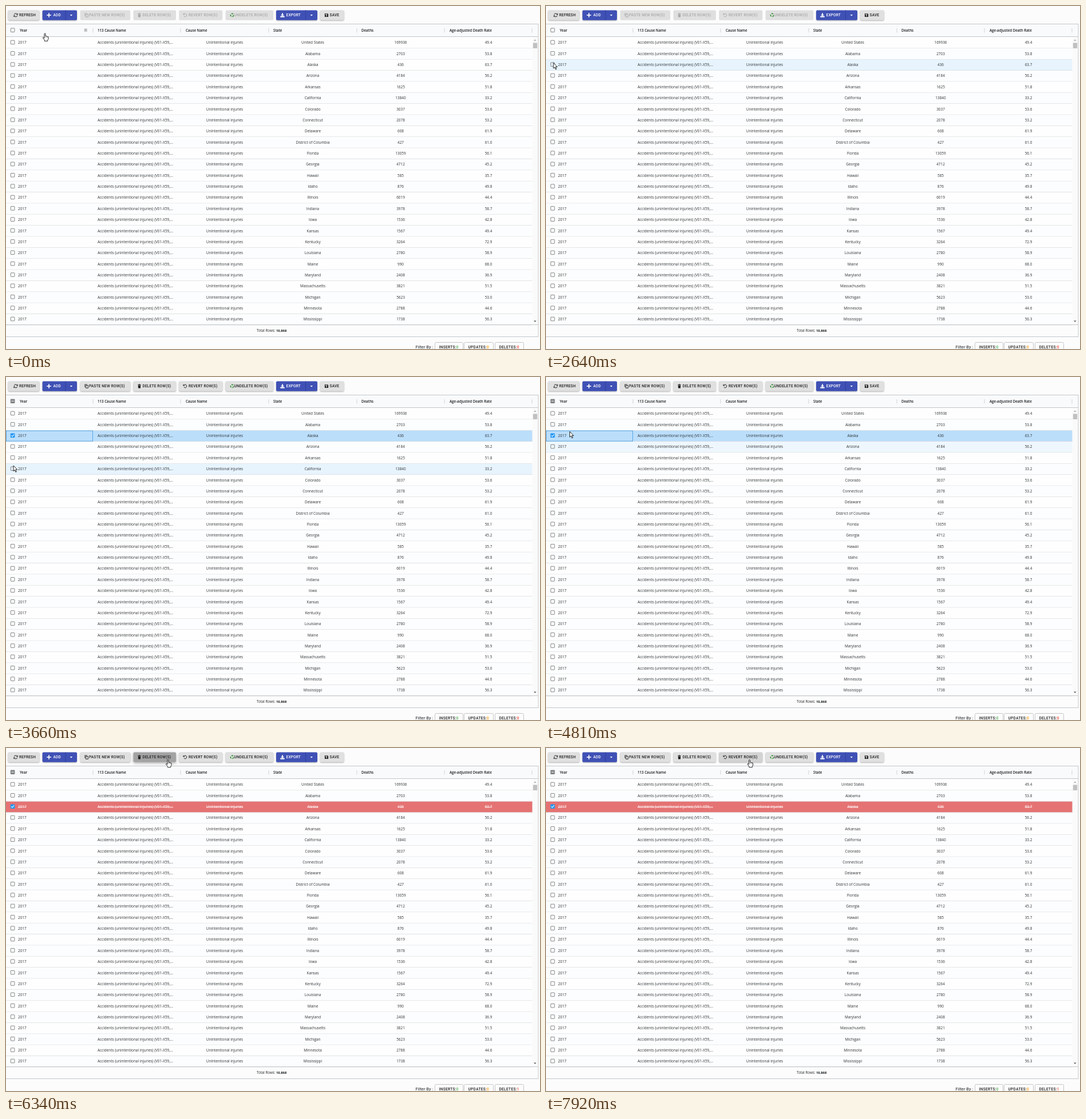
An HTML page with a canvas for the animation above (8000 ms loop, 933 by 600 pixels).

```html
<!DOCTYPE html>
<html lang="en">
<head>
<meta charset="utf-8">
<title>Editable grid</title>
<style>
html, body { margin: 0; width: 100%; height: 100%; overflow: hidden; background: #fcfcfc; }
canvas { display: block; }
</style>
</head>
<body>
<canvas id="stage" width="933" height="600"></canvas>
<script>
const ctx = document.getElementById('stage').getContext('2d');
const LOOP = 8000, TOP = 55, ROW = 19.36, SELECTED = 2;
const SELECT_AT = 2780, PRESS_AT = 6060, DELETE_AT = 6330;
const SANS = '"Open Sans", "Noto Sans", sans-serif';
const ROBOTO = 'Roboto, Arial, sans-serif';

const rows = `United States,169936,49.4|Alabama,2703,53.8|Alaska,436,63.7|Arizona,4184,56.2
Arkansas,1625,51.8|California,13840,33.2|Colorado,3037,53.6|Connecticut,2078,53.2
Delaware,608,61.9|District of Columbia,427,61.0|Florida,13059,56.1|Georgia,4712,45.2
Hawaii,585,35.7|Idaho,876,49.8|Illinois,6019,44.4|Indiana,3978,58.7
Iowa,1536,42.8|Kansas,1567,49.4|Kentucky,3264,72.9|Louisiana,2780,58.9
Maine,990,68.0|Maryland,2408,36.9|Massachusetts,3821,51.5|Michigan,5623,53.0
Minnesota,2788,44.6|Mississippi,1738,56.3`.split(/[|\n]/).map(r => r.split(','));

const columns = [['Year', 24], ['113 Cause Name', 160], ['Cause Name', 314],
  ['State', 467], ['Deaths', 621], ['Age-adjusted Death Rate', 775]];
const edges = [152, 305, 459, 613, 766, 919];

// label, left, right, text x, icon, icon x, kind, split
const buttons = [
  ['REFRESH', 3.7, 58.5, 23, refreshIcon, 17],
  ['ADD', 63.6, 124, 82.5, plusIcon, 75, 'blue', 104],
  ['PASTE NEW ROW(S)', 129.6, 217.2, 145, copyIcon, 140.5, 'edit'],
  ['DELETE ROW(S)', 222.5, 297, 238.5, trashIcon, 233, 'edit'],
  ['REVERT ROW(S)', 302.2, 378.3, 319, undoIcon, 313, 'edit'],
  ['UNDELETE ROW(S)', 383.6, 467.2, 398.5, recycleIcon, 395, 'edit'],
  ['EXPORT', 472, 544, 489.5, downloadIcon, 483, 'blue', 523.5],
  ['SAVE', 548.8, 590.4, 565.5, floppyIcon, 560]
];

// Screen updates come in bursts: first, last, number of steps
const bursts = [[160, 160, 1], [1620, 2340, 6], [2640, 3660, 8],
  [4660, 5640, 8], [6060, 6750, 6], [7350, 7920, 5]];
const ticks = [0].concat(...bursts.map(([a, b, n]) =>
  Array.from({ length: n }, (_, i) => n > 1 ? a + (b - a) * i / (n - 1) : a)));

// time, x, y of the pointer tip
const path = [
  [0, 68, 47.5], [1475, 68, 47.5], [1620, 60, 55], [1910, 25, 98], [2055, 14, 106], [2340, 13, 99.5],
  [2786, 13, 99.5], [2931, 13, 111], [3077, 16, 330], [3223, 18, 498], [3369, 15, 340],
  [3514, 13, 162], [3660, 13, 155],
  [4520, 13, 155], [4660, 26, 125], [4800, 41.5, 95.5], [4940, 95, 72], [5080, 170, 50],
  [5220, 235, 32], [5360, 272, 23], [5500, 283, 20],
  [7208, 283, 20], [7350, 290, 27], [7492, 312, 34], [7635, 338, 33], [7777, 352, 24],
  [7920, 355.5, 20], [8000, 355.5, 20]
];

function pointerAt(t) {
  const i = Math.max(1, path.findIndex(p => p[0] >= t));
  const [t0, x0, y0] = path[i - 1], [t1, x1, y1] = path[i];
  const k = (t - t0) / (t1 - t0);
  return { x: x0 + (x1 - x0) * k, y: y0 + (y1 - y0) * k };
}

const rowAt = y => y < TOP || y > 557 ? -1 : Math.floor((y - TOP) / ROW);
const columnAt = p => p.y > 32 && p.y < TOP ? edges.findIndex(e => p.x < e) : -1;

function rect(x, y, w, h, color) {
  ctx.fillStyle = color;
  ctx.fillRect(x, y, w, h);
}

function text(s, x, y, font, color, align = 'left', spacing = 0) {
  ctx.font = font;
  ctx.letterSpacing = spacing + 'px';
  ctx.textAlign = align;
  ctx.fillStyle = color;
  ctx.fillText(s, x, y);
  return ctx.measureText(s).width;
}

function rounded(x, y, w, h, r) {
  ctx.beginPath();
  ctx.roundRect(x, y, w, h, r);
}

function poly(points, fill) {
  ctx.beginPath();
  points.forEach(([x, y]) => ctx.lineTo(x, y));
  ctx.closePath();
  ctx.fillStyle = fill;
  ctx.fill();
}

function line(points, color, width) {
  ctx.beginPath();
  points.forEach(([x, y]) => ctx.lineTo(x, y));
  ctx.strokeStyle = color;
  ctx.lineWidth = width;
  ctx.stroke();
}

function arc(r, a, b, color, width) {
  ctx.beginPath();
  ctx.arc(0, 0, r, a, b);
  ctx.strokeStyle = color;
  ctx.lineWidth = width;
  ctx.stroke();
}

// Icons are drawn around (0, 0)
function refreshIcon(c) {
  arc(2.9, 3.4, 5.9, c, 1);
  arc(2.9, 0.25, 2.75, c, 1);
  poly([[3.7, -3.6], [3.7, -0.5], [0.8, -0.5]], c);
  poly([[-3.7, 3.6], [-3.7, 0.5], [-0.8, 0.5]], c);
}
function plusIcon(c) {
  rect(-3.8, -0.8, 7.6, 1.6, c);
  rect(-0.8, -3.8, 1.6, 7.6, c);
}
function copyIcon(c) {
  line([[-2.7, 2], [-2.7, -3], [1.2, -3]], c, 0.9);
  ctx.strokeRect(-0.9, -1.4, 3.7, 4.7);
}
function trashIcon(c) {
  rect(-2.7, -3, 5.4, 0.9, c);
  rect(-1, -3.6, 2, 0.9, c);
  poly([[-2.3, -1.5], [2.3, -1.5], [2, 3.5], [-2, 3.5]], c);
}
function undoIcon(c) {
  arc(2.7, -2.5, 2.4, c, 1);
  poly([[-3.5, -3.6], [-3.5, -0.4], [-0.4, -0.4]], c);
}
function recycleIcon() {
  for (let i = 0; i < 3; i++) {
    const a = i * Math.PI * 2 / 3;
    arc(2.6, a, a + 1.4, '#2e8b2e', 1.4);
  }
}
function downloadIcon(c) {
  rect(-0.9, -3.6, 1.8, 3.2, c);
  poly([[-2.8, -0.9], [2.8, -0.9], [0, 1.9]], c);
  rect(-3.7, 1.6, 7.4, 2.1, c);
}
function floppyIcon(c) {
  poly([[-3.1, -3.1], [1.8, -3.1], [3.1, -1.8], [3.1, 3.1], [-3.1, 3.1]], c);
  rect(-2, -2.2, 3.3, 1.5, '#e0e0e0');
  ctx.beginPath();
  ctx.arc(0, 1.1, 1, 0, 7);
  ctx.fill();
}

function drawButton([label, x0, x1, tx, icon, ix, kind, split], t, p) {
  const off = kind === 'edit' && t < SELECT_AT;
  const blue = kind === 'blue';
  const hover = !off && p.x > x0 && p.x < x1 && p.y > 7 && p.y < 25;
  const color = blue ? '#fff' : off ? '#a9a9a9' : '#212121';
  const age = t - PRESS_AT;
  const pressed = label.startsWith('DELETE') && age >= 0 && age < 680;
  const top = 7.6, height = 17.2;

  ctx.save();
  if (!off) {
    ctx.shadowColor = 'rgba(0,0,0,.32)';
    ctx.shadowOffsetY = pressed ? 1.6 : 0.9;
    ctx.shadowBlur = pressed ? 5 : 2.2;
  }
  rounded(x0, top, x1 - x0, height, 2);
  ctx.fillStyle = blue ? '#3f51b5' : off ? '#dfdfdf' : hover ? '#d3d3d3' : '#e0e0e0';
  ctx.fill();
  ctx.restore();

  if (pressed) {
    ctx.save();
    ctx.clip();
    const grow = Math.min(1, age / 276);
    const fade = age < 300 ? 1 : 1 - (age - 276) / 414;
    rect(x0, top, x1 - x0, height, `rgba(0,0,0,${0.04 * fade})`);
    ctx.beginPath();
    ctx.arc(284, 20, 6 + 64 * grow, 0, 7);
    ctx.fillStyle = `rgba(0,0,0,${(0.1 + 0.1 * grow) * fade})`;
    ctx.fill();
    ctx.restore();
  }
  if (split) {
    rect(split - 0.5, top, 1, height, '#303f9f');
    const cx = (split + x1) / 2;
    poly([[cx - 2.2, 15], [cx + 2.2, 15], [cx, 17.4]], '#fff');
  }
  ctx.save();
  ctx.translate(ix, 16);
  icon(color);
  ctx.restore();
  text(label, tx, 18.4, '500 6.5px ' + ROBOTO, color, 'left', 0.2);
}

function checkbox(y, state) {
  if (!state) {
    ctx.strokeStyle = '#858585';
    ctx.lineWidth = 1;
    rounded(8.3, y - 3.3, 6.6, 6.6, 0.6);
    ctx.stroke();
    return;
  }
  rounded(7.8, y - 3.8, 7.6, 7.6, 1);
  ctx.fillStyle = state === 'some' ? '#7f8385' : '#2196f3';
  ctx.fill();
  if (state === 'some') rect(9.4, y - 0.5, 4.4, 1, '#fff');
  else line([[9.2, y], [11, y + 1.8], [14.2, y - 1.8]], '#fff', 1.1);
}

function drawHeader(t, p, prev) {
  rect(0, 32, 930, 22, '#f9fafb');
  for (const [name, x] of columns) text(name, x, 45.1, '600 6.2px ' + SANS, '#181d1f');
  for (const x of edges) rect(x - 0.5, 39, 1, 7.5, '#d0d4d7');
  const col = columnAt(p);
  if (col >= 0) {
    ctx.globalAlpha = t < 160 ? 0.7 : columnAt(prev) === col ? 1 : 0.5;
    for (let i = 0; i < 3; i++) rect(edges[col] - 15.3, 40 + i * 1.8, 5, 0.8, '#444');
    ctx.globalAlpha = 1;
  }
  checkbox(42.2, t >= SELECT_AT && 'some');
}

function drawRow([state, deaths, rate], i, t, p, prev) {
  const y = TOP + ROW * i, base = 66.4 + ROW * i;
  const chosen = i === SELECTED && t >= SELECT_AT;
  const deleted = chosen && t >= DELETE_AT;
  const hovered = rowAt(p.y) === i, fading = rowAt(prev.y) === i;
  rect(0, y, 919.5, ROW, deleted ? '#e57373' : chosen ? '#bbdefb' : hovered ? '#e7f4fe'
    : fading ? '#eef7fd' : i % 2 ? '#fcfdfe' : '#fefefe');
  rect(0, y + ROW - 0.8, 919.5, 0.8, '#d9dcde');

  const cells = [['2017', 21], ['Accidents (unintentional injuries) (V01-X59,...', 160],
    ['Unintentional injuries', 382, 1], [state, 536, 1], [deaths, 689.5, 1], [rate, 843, 1]];
  for (const [s, x, mid] of cells) {
    const w = text(s, x, base, '6.4px ' + SANS, deleted ? '#fff' : '#2e3234', mid ? 'center' : 'left');
    if (deleted) rect(mid ? x - w / 2 : x, base - 2.4, w, 0.8, '#fff');
  }
  checkbox(63.5 + ROW * i, chosen && 'on');
  if (chosen && t < PRESS_AT) {
    ctx.strokeStyle = '#4d9fdf';
    ctx.lineWidth = 0.9;
    ctx.strokeRect(0.5, y + 0.4, 151, ROW - 1.3);
  }
}

function drawFrame() {
  const c = '#c3c8cc';
  rect(0, 31, 930, 1, c);
  rect(0, 53, 930, 1, c);
  rect(0, 557, 930, 1, c);
  rect(0, 578, 930, 1, c);
  rect(929.5, 31, 1, 548, c);
  rect(920, 54, 9, 503, '#fafafa');
  rect(920.8, 64.5, 7.4, 9.5, '#c1c1c1');
  poly([[922, 60.8], [926.6, 60.8], [924.3, 58.4]], '#a3a3a3');
  poly([[922, 550.4], [926.6, 550.4], [924.3, 552.8]], '#505050');
}

function drawFooter(t) {
  const w = text('Total Rows: ', 438, 570.2, '6.2px ' + SANS, '#24282a');
  text('10,868', 438 + w, 570.2, '700 5.8px ' + SANS, '#181d1f');
  text('Filter By :', 715.5, 599.4, '7.6px ' + ROBOTO, '#212529');
  const tallies = [['INSERTS:', 749.5, 49, 0, '#4caf50'], ['UPDATES:', 800.5, 51, 0, '#ff9800'],
    ['DELETES:', 854.5, 50, t >= DELETE_AT ? 1 : 0, '#f44336']];
  for (const [label, x, width, n, color] of tallies) {
    ctx.strokeStyle = '#c6c6c6';
    ctx.lineWidth = 1;
    rounded(x, 588.5, width, 17, 2);
    ctx.stroke();
    const font = '500 6.5px ' + ROBOTO;
    const lw = text(label, x + 7, 598.9, font, '#212121', 'left', 0.35);
    text(n, x + 7 + lw, 598.9, font, color);
  }
}

function drawPointer({ x, y }) {
  const onButton = y > 7 && y < 25 && buttons.some(b => x > b[1] && x < b[2]);
  const hand = onButton || (y > 32 && y < TOP);
  ctx.save();
  ctx.translate(x, y);
  ctx.lineJoin = 'round';
  const shape = new Path2D(hand
    ? 'M-1 1Q0 -.5 1 1V5.2Q2.2 4.5 2.8 5.6Q4 5 4.5 6.1Q6 5.7 6 7.2V10.2L4.8 12V13.8H-.6V12.2L-3.4 8.6Q-3.8 7.2 -2.4 7.4L-1 8.8Z'
    : 'M0 0V9.6L2.2 7.6L3.9 11.4L5.4 10.7L3.7 7H6.8Z');
  ctx.fillStyle = '#fff';
  ctx.fill(shape);
  ctx.strokeStyle = '#111';
  ctx.lineWidth = 0.9;
  ctx.stroke(shape);
  if (hand) for (const k of [1, 2.8, 4.5]) line([[k, 5.8], [k, 7.6]], '#333', 0.5);
  ctx.restore();
}

function draw(now) {
  const time = now % LOOP;
  let step = ticks.length - 1;
  while (ticks[step] > time) step--;
  const t = ticks[step];
  const p = pointerAt(t), prev = pointerAt(ticks[Math.max(0, step - 1)]);

  rect(0, 0, 933, 600, '#fcfcfc');
  buttons.forEach(b => drawButton(b, t, p));
  rows.forEach((r, i) => drawRow(r, i, t, p, prev));
  drawHeader(t, p, prev);
  drawFrame();
  drawFooter(t);
  drawPointer(p);
}

const start = performance.now();
function loop() {
  draw(performance.now() - start);
  requestAnimationFrame(loop);
}
loop();
</script>
</body>
</html>
```
